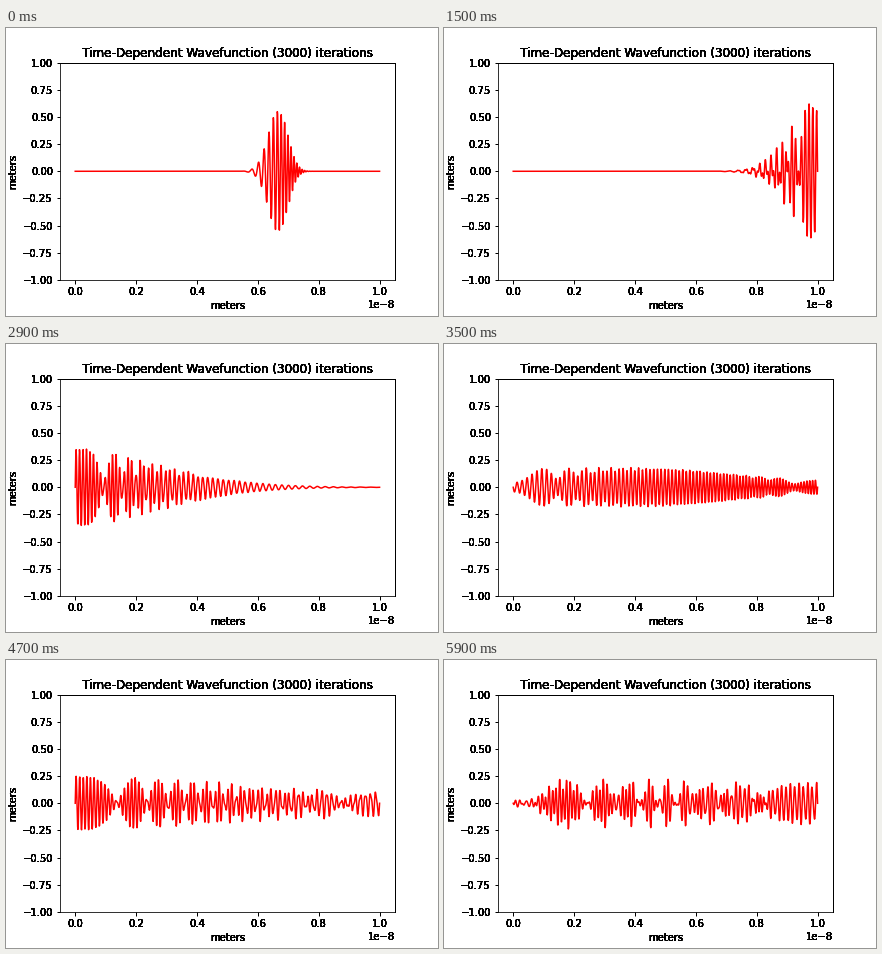
These frames come from a looping animation (432 by 288 pixels, 6000 ms). A matplotlib script:

```python
import matplotlib.pyplot as plt
import numpy as np
from matplotlib.animation import FuncAnimation

# Electron in a box, solved with the Crank-Nicolson scheme
HBAR = 1.0546e-34
MASS = 9.109e-31
LENGTH = 1e-8
CELLS = 1000
STEP = 1e-19
SIGMA = 1e-10
KAPPA = 5e10

FRAMES = 60
INTERVAL = 100
START_STEPS = 3000
INK = 12

x = np.linspace(0, LENGTH, CELLS + 1)
inner = np.arange(1, CELLS)
modes = np.sin(np.pi * np.outer(inner, inner) / CELLS)

packet = np.exp(-((x - LENGTH / 2) ** 2) / (2 * SIGMA**2) + 1j * KAPPA * x)
weights = 2 / CELLS * (modes @ packet[1:-1])

# Phase each sine mode turns through in one time step
cell = LENGTH / CELLS
theta = STEP * HBAR / (2 * MASS * cell**2) * (1 - np.cos(np.pi * inner / CELLS))
turn = 2 * np.arctan(theta)


def wave(steps):
    psi = np.zeros(CELLS + 1)
    psi[1:-1] = (modes @ (weights * np.exp(-1j * turn * steps))).real
    return psi


def steps_at(frame):
    """Each frame advances 50 steps more than the one before it."""
    return START_STEPS + 25 * frame * (frame + 1)


def thicken(text):
    """Overprint the text so its soft edges become solid black."""
    draw = text.draw

    def overprint(renderer):
        for _ in range(INK):
            draw(renderer)

    text.draw = overprint


plt.rcParams["font.family"] = "DejaVu Sans"
fig, ax = plt.subplots(figsize=(6, 4), dpi=72, facecolor="white")
fig.subplots_adjust(left=0.125, right=0.9, bottom=0.125, top=0.88)

line, = ax.plot(x, wave(START_STEPS), color="red", linewidth=1.5)
ax.set_xlim(-0.05 * LENGTH, 1.05 * LENGTH)
ax.set_ylim(-1, 1)
ax.set_title("Time-Dependent Wavefunction (3000) iterations")
ax.set_xlabel("meters")
ax.set_ylabel("meters")
ax.tick_params(width=1)
for side in ("top", "right"):
    ax.spines[side].set_linewidth(1)

labels = [ax.title, ax.xaxis.label, ax.yaxis.label, ax.xaxis.offsetText]
for label in labels + ax.get_xticklabels() + ax.get_yticklabels():
    thicken(label)


def update(frame):
    line.set_ydata(wave(steps_at(frame)))
    return (line,)


anim = FuncAnimation(fig, update, frames=FRAMES, interval=INTERVAL, repeat=True)
plt.show()
```
